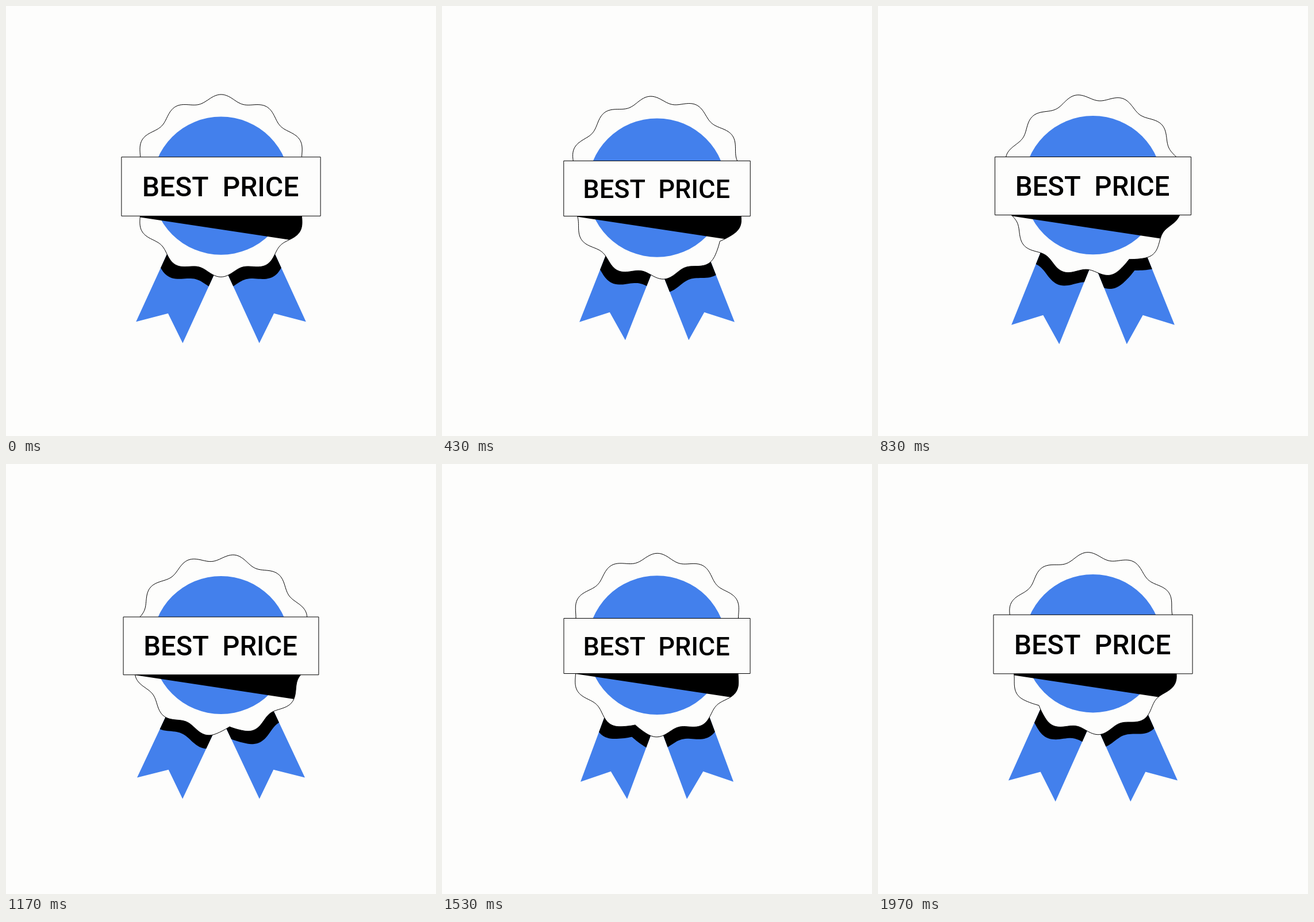
Recreate the animation shown at these times as an HTML page with a canvas. Size 748 px wide and 748 px high, loop 2010 ms.

```html
<!DOCTYPE html>
<html lang="en">
<head>
<meta charset="utf-8">
<title>Best price badge</title>
<style>
html, body { margin: 0; width: 100%; height: 100%; overflow: hidden; background: #fdfdfc; }
canvas { display: block; width: 748px; height: 748px; }
</style>
</head>
<body>
<canvas id="stage" width="748" height="748"></canvas>
<script>
const ctx = document.getElementById('stage').getContext('2d');
const LOOP = 2010, BEAT = LOOP / 2, RAD = Math.PI / 180;
const BLUE = '#4380ec', BLACK = '#000', WHITE = '#fdfdfc';

// Sway around a middle value, largest at the given time of each beat
const sway = (t, mid, amp, peak) => mid + amp * Math.cos(2 * Math.PI * (t - peak) / BEAT);

function polygon(points) {
  const path = new Path2D();
  points.forEach(([x, y]) => path.lineTo(x, y));
  path.closePath();
  return path;
}

// Twelve-lobed rosette; the valley at 15 degrees ends in a sharp corner
function rosette(radius, turn) {
  const points = [];
  for (let deg = 0; deg < 360; deg++) {
    const off = Math.abs(deg - 15);
    const wave = off < 7.5 ? (off - 7.5) * 12 * RAD : Math.cos(12 * deg * RAD);
    const r = radius * (1.27 + 0.051 * wave);
    const a = (deg + turn) * RAD;
    points.push([r * Math.cos(a), r * Math.sin(a)]);
  }
  return polygon(points);
}

// Swallow-tailed ribbon, placed by its tip
function ribbon(side, scale, lean, swing) {
  const a = lean * RAD, b = swing * RAD, tip = 278.5 * scale;
  const at = (across, up) => [
    side * (tip * Math.sin(b) + scale * (across * Math.cos(a) - up * Math.sin(a))),
    tip * Math.cos(b) - scale * (across * Math.sin(a) + up * Math.cos(a))
  ];
  return polygon([at(0, 0), at(44.2, 36), at(88.3, 0), at(88.3, 160), at(0, 160)]);
}

function fill(path, color) {
  ctx.fillStyle = color;
  ctx.fill(path);
}

function fillInside(clip, path, color) {
  ctx.save();
  ctx.clip(clip);
  fill(path, color);
  ctx.restore();
}

function drawRibbons(t, shade) {
  const scale = sway(t, 0.9945, 0.023, 892);
  const lean = sway(t, 22.6, 2.7, 117);
  const swing = sway(t, 12.4, 1.7, 117);
  for (const side of [-1, 1]) {
    const shape = ribbon(side, scale, lean, swing);
    fill(shape, BLUE);
    fillInside(shape, shade, BLACK);
  }
}

function drawBanner(scale, edge) {
  const w = 172.8 * scale, h = 51.2 * scale, drop = 1.4;
  const shade = polygon([
    [-w, h - 9], [w, h - 9], [w, 100.7 * scale + drop], [-w, 48.5 * scale + drop]
  ]);
  fillInside(edge, shade, BLACK);

  ctx.translate(0, drop);
  const box = polygon([[-w, -h], [w, -h], [w, h], [-w, h]]);
  fill(box, WHITE);
  ctx.stroke(box);
  ctx.scale(scale, scale);
  ctx.font = '500 48px Roboto, sans-serif';
  ctx.textAlign = 'center';
  ctx.fillStyle = BLACK;
  ctx.fillText('BEST\u00a0\u00a0PRICE', -1, 17.3);
}

function draw(t) {
  const radius = sway(t, 120.5, 0.5, 620);
  const turn = 118.5 * t / LOOP;
  const edge = rosette(radius, turn);
  const disc = new Path2D();
  disc.arc(0, 0, radius, 0, 2 * Math.PI);

  ctx.fillStyle = WHITE;
  ctx.fillRect(0, 0, 748, 748);
  ctx.save();
  ctx.translate(374, sway(t, 314, 2.4, 350));
  ctx.lineWidth = 1;
  ctx.strokeStyle = BLACK;
  drawRibbons(t, rosette(radius * 1.15, turn));
  fill(edge, WHITE);
  ctx.stroke(edge);
  fill(disc, BLUE);
  drawBanner(sway(t, 0.9695, 0.0325, -15), edge);
  ctx.restore();
}

const start = performance.now();
function tick() {
  draw((performance.now() - start) % LOOP);
  requestAnimationFrame(tick);
}
tick();
</script>
</body>
</html>
```
